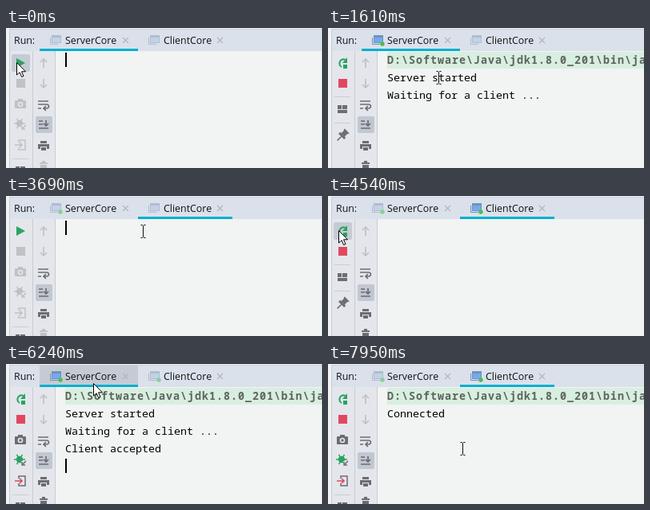
An HTML page for the animation above (8000 ms loop, 395 by 176 pixels).

```html
<!DOCTYPE html>
<html lang="en">
<head>
<meta charset="utf-8">
<title>Run tool window</title>
<style>
html, body { margin: 0; width: 100%; height: 100%; overflow: hidden; background: #f2f3f3; }
svg { display: block; }
.ui { font: 12.4px "Open Sans", "Noto Sans", sans-serif; fill: #111; }
.out { font: 500 13.33px "Noto Sans Mono", "DejaVu Sans Mono", monospace; fill: #000; }
.cmd { font-weight: 700; letter-spacing: 1px; fill: #5d645e; }
</style>
</head>
<body>
<svg id="stage" width="395" height="176" viewBox="0 0 395 176"></svg>
<script>
const LOOP = 8000, STEP = 120;
const ROW = 22, TOP = 31, LEFT = 74;
const DARK = '#6a6d72', DIM = '#c0c1c4', GREEN = '#2aa361', RED = '#e04860';
const BAR = '#e4e6eb', EDGE = '#c6ccd6', HOVER = '#c5cbd4';
const stage = document.getElementById('stage');

const switches = [3450, 5870, 6840];
const accepted = 5030, caretOff = 7950;

const home = { x: 13, y: 43 };
const glides = [
  { from: 1370, to: 1610, x: 138, y: 62 },
  { from: 1610, to: 2210, x: 226, y: 16 },
  { from: 3330, to: 3690, x: 171, y: 44 },
  { from: 3690, to: 4170, ...home },
  { from: 5150, to: 5270, x: 38, y: 38 },
  { from: 5270, to: 5750, x: 109, y: 24 },
  { from: 6240, to: 6840, x: 207, y: 20 },
  { from: 6970, to: 7210, x: 168, y: 106 }
];

const tabs = [
  {
    name: 'ServerCore', x: 42, w: 123, runAt: 1000,
    lines: [[1000, ''], [1120, 'Server started'], [1120, 'Waiting for a client ...'], [accepted, 'Client accepted']]
  },
  {
    name: 'ClientCore', x: 165, w: 118, runAt: 4540,
    lines: [[4660, ''], [accepted, 'Connected']]
  }
];

// The toolbar grows back to its full set while the process runs
function tools(age) {
  if (age < 0) return 'play stop camera bug exit | layout';
  if (age < 720) return 'rerun stop | layout | pin';
  if (age < 1330) return 'rerun stop camera exit | layout';
  return 'rerun stop camera bug exit | layout';
}

const rect = (x, y, w, h, fill, rx = 0) =>
  `<rect x="${x}" y="${y}" width="${w}" height="${h}" rx="${rx}" fill="${fill}"/>`;
const dot = (x, y, r, fill) => `<circle cx="${x}" cy="${y}" r="${r}" fill="${fill}"/>`;
const shape = (d, c) => `<path d="${d}" fill="${c}"/>`;
const line = (d, c, w = 1.5) => `<path d="${d}" fill="none" stroke="${c}" stroke-width="${w}"/>`;
const group = (x, y, body, turn = 0) => `<g transform="translate(${x} ${y}) rotate(${turn})">${body}</g>`;
const text = (x, y, cls, s) => `<text x="${x}" y="${y}" class="${cls}">${s}</text>`;
const ink = on => on ? DARK : DIM;

// Icons are centred on 0,0; "on" means the process is running
const icons = {
  play: () => shape('M-5-6L6 0L-5 6Z', GREEN),
  rerun: () => line('M4-4A5 5 0 1 0-1 5', GREEN, 2) + shape('M6-7V0H0Z', GREEN) + rect(1, 2, 5, 5, GREEN),
  stop: on => rect(-5, -6, 11, 11, on ? RED : DIM),
  camera: on => rect(-7, -4, 14, 10, ink(on), 1) + rect(-3, -6, 6, 3, ink(on)) +
    dot(0, 1, 3.3, BAR) + dot(0, 1, 1.7, ink(on)),
  bug: on => {
    const c = on ? GREEN : DIM;
    let legs = '';
    for (let a = 0; a < 360; a += 60) legs += group(0, 0, line('M0 0V-7', c), a + 30);
    return group(-1, -1, legs + dot(0, 0, 4.2, c)) + rect(1, 1, 7, 6, BAR) +
      line('M7 1L2 6M2 2V6H6', ink(on));
  },
  exit: on => line('M-2-3V-6H6V6H-2V3', ink(on)) + line('M-7 0H2M-1-3L2 0L-1 3', on ? RED : DIM, 1.7),
  layout: () => rect(-6, -5, 5, 5, DARK) + rect(0, -5, 6, 5, DARK) + rect(-6, 1, 12, 4, DARK),
  pin: () => group(0, 1, rect(-4, -8, 8, 2, DARK) + rect(-3, -7, 6, 6, DARK) +
    rect(-5, -1, 10, 3, DARK) + line('M0 2V9', DARK), 45)
};

function pointerAt(t) {
  let { x, y } = home;
  for (const g of glides) {
    if (t < g.from) break;
    const passed = Math.floor((t - g.from) / STEP) * STEP;
    const u = Math.min(1, passed / (g.to - g.from));
    const k = u * (2 - u);
    x += (g.x - x) * k;
    y += (g.y - y) * k;
  }
  return { x: Math.round(x), y: Math.round(y) };
}

function toolbar(age) {
  let y = 44, out = '';
  for (const name of tools(age).split(' ')) {
    if (name === '|') {
      out += rect(8, Math.round(y - 9), 20, 1, EDGE);
      y += 6.5;
    } else {
      out += group(18, Math.round(y), icons[name](age >= 0));
      y += 25.7;
    }
  }
  return out;
}

function consoleTools(on) {
  const arrow = line('M0 6V-5M-4-1L0-5L4-1', DIM, 1.7);
  const trash = ink(on);
  return group(47, 44, arrow) + group(47, 70, arrow, 180) +
    group(47, 96, line('M-7-4H6M-7 0H4A2.3 2.3 0 0 1 4 5H0M3 2L0 5L3 8M-7 5H-3', DARK, 1.7)) +
    rect(37, 111, 21, 21, '#c1c7d1', 2) +
    group(47, 121, line('M-6-4H-1M-6 0H-1M-6 5H6M3-5V2M0-1L3 2L6-1', DARK, 1.7)) +
    group(47, 148, rect(-4, -6, 8, 3, DARK) + rect(-7, -2, 14, 6, DARK) +
      rect(-4, 1, 8, 6, BAR) + rect(-3, 2, 6, 4, DARK)) +
    group(47, 174, rect(-5, -5, 10, 2, trash) + rect(-2, -7, 4, 2, trash) + rect(-4, -2, 8, 8, trash));
}

function tabIcon(live) {
  const frame = live ? '#7291b8' : '#b2bcca';
  const pane = live ? '#74aaf0' : '#c0d3ec';
  return line('M.5 3V11.5H10', frame, 1) + rect(2, 0, 12, 10, frame) + rect(3, 3, 10, 6, pane);
}

function tabView(tab, active, hover, on) {
  const { x, w, name } = tab;
  return (hover ? rect(x, 2, w, 27, HOVER) : '') +
    (active ? rect(x, 26, w, 3, '#00b0d0') : '') +
    group(x + 13, 9, tabIcon(active && on)) +
    (on ? dot(x + 26, 20, 2.7, active ? '#45c04f' : '#83d394') : '') +
    text(x + 32, 20, 'ui', name) +
    line(`M${x + w - 19} 12l7 7m0-7l-7 7`, '#b0b5bd', 1.1);
}

function output(rows) {
  return rows.map(([, s], i) => {
    const base = TOP + 14 + ROW * i;
    return i ? text(LEFT, base, 'out', s)
      : rect(LEFT, TOP - 1, 321, 21, '#d8eedf') +
        text(LEFT, base, 'out cmd', 'D:\\Software\\Java\\jdk1.8.0_201\\bin\\java.exe');
  }).join('');
}

function cursorView({ x, y }) {
  const body = x > 62 && y > 30
    ? line('M-3-8H-1L0-7L1-8H3M0-7V7M-3 8H-1L0 7L1 8H3', '#111', 1)
    : '<path d="M0 0V15.5L3.6 12.2L6.1 18L8.5 17L6 11.3H11Z" fill="#fff" stroke="#000"/>';
  return group(x + .5, y + .5, body);
}

function scene(t) {
  const p = pointerAt(t);
  const sel = switches.filter(s => t >= s).length % 2;
  const tab = tabs[sel];
  const age = t - tab.runAt;
  const rows = tab.lines.filter(([start]) => t >= start);
  const overRun = p.x > 7 && p.x < 30 && p.y > 32 && p.y < 55;
  const overTab = v => p.y < 30 && p.x >= v.x && p.x < v.x + v.w;
  const caret = age < 0 || (t >= switches[1] && t < caretOff);
  return rect(0, 0, 395, 176, '#f2f3f3') +
    rect(5, 2, 390, 27, '#dae1eb') + rect(5, 29, 57, 147, BAR) +
    rect(4, 1, 391, 1, EDGE) + rect(4, 1, 1, 175, EDGE) +
    rect(33, 29, 1, 147, EDGE) + rect(61, 29, 1, 147, EDGE) +
    text(10, 20, 'ui', 'Run:') +
    tabs.map((v, i) => tabView(v, i === sel, overTab(v), t >= v.runAt)).join('') +
    (overRun ? rect(7, 33, 23, 22, HOVER, 2) : '') +
    toolbar(age) + consoleTools(age >= 0) + output(rows) +
    (caret ? rect(LEFT, TOP + ROW * rows.length, 2, 18, '#000') : '') +
    cursorView(p);
}

const origin = performance.now();
let shown = '';
function draw(now) {
  const next = scene(Math.max(0, now - origin) % LOOP);
  if (next !== shown) stage.innerHTML = shown = next;
  requestAnimationFrame(draw);
}
draw(origin);
</script>
</body>
</html>
```
